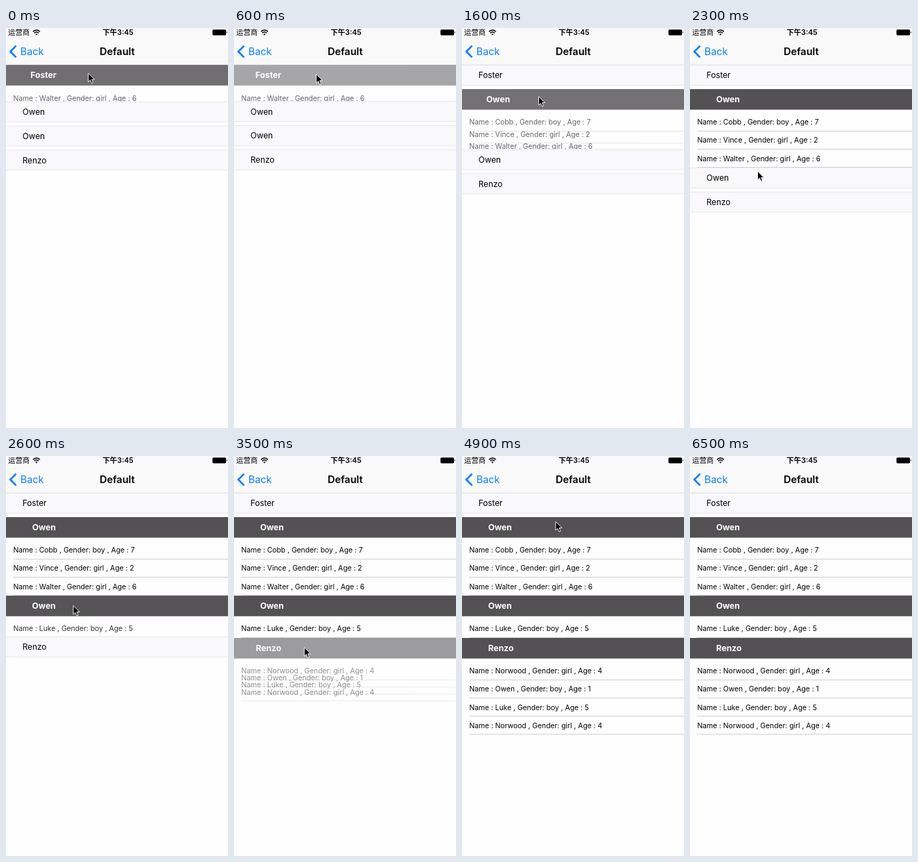
These frames come from a looping animation (320x576 px, 6600 ms). An HTML page:

```html
<!DOCTYPE html>
<html lang="en">
<head>
<meta charset="utf-8">
<title>Expandable list</title>
<style>
  html, body { margin: 0; width: 100%; height: 100%; overflow: hidden; background: #fefefe; }
  svg { display: block; width: 320px; height: 576px; }
  text { font-family: Inter, "Noto Sans CJK SC", "Noto Sans CJK", sans-serif; white-space: pre; }
</style>
</head>
<body>
<svg id="stage" viewBox="0 0 320 576">
  <rect width="320" height="576" fill="#fefefe"/>
  <rect width="320" height="53" fill="#f9f9fa"/>
  <rect y="52.9" width="320" height=".7" fill="#aaaaad"/>
  <g id="list"></g>
  <text x="3" y="10.2" font-size="10.4">运营商</text>
  <g fill="none" stroke="#000" stroke-width="1.5">
    <path d="M38.8 5.2Q43.9 .8 49 5.2M40.6 7.2Q43.9 4.5 47.2 7.2"/>
    <path d="M43.9 10.6l-1.8-1.8q1.8-1.3 3.6 0z" fill="#000" stroke="none"/>
  </g>
  <text x="161.5" y="10.2" font-size="10.5" font-weight="600" text-anchor="middle">下午3:45</text>
  <rect x="297.6" y="2.2" width="19.6" height="8.2" rx="1.6"/>
  <path d="M318 4.8q1.7 1.5 0 3z"/>
  <path d="M14.6 25.6L6.2 34l8.4 8.4" fill="none" stroke="#0a7fff" stroke-width="2.6"/>
  <text x="20.8" y="39.2" font-size="14.4" fill="#0a7fff">Back</text>
  <text x="160.3" y="39.2" font-size="14.5" font-weight="600" text-anchor="middle">Default</text>
  <path id="cursor" d="M0 0V12.6L2.9 9.9 4.9 14.5 7 13.6 5.1 9.1H9.1Z"
        stroke="#fff" stroke-width=".9" stroke-linejoin="round"/>
</svg>
<script>
const LOOP = 6600, STEP = 100, DURATION = 300;
const TOP = 53.2, PITCH = 34.8, HEADER = 29.6, ROW = 26.1;
const CLOSED = [249, 248, 250], OPEN = [83, 81, 83];

const sections = [
  { title: 'Foster', opens: -183, closes: 480, people: [['Walter', 'girl', 6]] },
  { title: 'Owen', opens: 1421, people: [['Cobb', 'boy', 7], ['Vince', 'girl', 2], ['Walter', 'girl', 6]] },
  { title: 'Owen', opens: 2357, people: [['Luke', 'boy', 5]] },
  { title: 'Renzo', opens: 3370, people: [['Norwood', 'girl', 4], ['Owen', 'boy', 1], ['Luke', 'boy', 5], ['Norwood', 'girl', 4]] },
];

// Pointer path: time, x, y
const path = [
  [0, 118.5, 65], [400, 118.5, 65], [900, 118.5, 69], [1000, 119, 72], [1100, 122, 79],
  [1200, 92, 105], [1300, 92, 105], [1400, 108, 99], [1600, 110.5, 98.5], [1700, 110.5, 99],
  [2000, 98, 197], [2200, 98, 197], [2400, 97, 215.5], [2900, 97, 215.5], [3300, 101.5, 275.5],
  [3900, 101, 276], [4600, 131, 114], [4900, 135, 94.5], [5000, 135, 94.5], [5500, 74.5, 56], [5700, 88.5, 49.5],
];
const POINTER_END = 5800;

const clamp = v => Math.min(1, Math.max(0, v));
const mix = (a, b, k) => a + (b - a) * k;

function ease(t) {
  // cubic-bezier(.42, 0, .58, 1), solved by bisection
  let lo = 0, hi = 1;
  for (let i = 0; i < 20; i++) {
    const s = (lo + hi) / 2;
    const x = 1.26 * s * (1 - s) ** 2 + 1.74 * s * s * (1 - s) + s ** 3;
    if (x < t) lo = s; else hi = s;
  }
  return lo * lo * (3 - 2 * lo);
}

function set(node, attrs) {
  for (const key in attrs) node.setAttribute(key, attrs[key]);
  return node;
}

function add(parent, tag, attrs, label = '') {
  const node = set(document.createElementNS('http://www.w3.org/2000/svg', tag), attrs);
  node.textContent = label;
  return parent.appendChild(node);
}

const list = document.getElementById('list');
const cursor = document.getElementById('cursor');

for (const section of sections) {
  section.rows = section.people.map(([name, gender, age]) => {
    const row = add(list, 'g', {});
    add(row, 'text', { x: 10.5, y: 16.5, 'font-size': 10.3 }, `Name : ${name} , Gender: ${gender} , Age : ${age}`);
    add(row, 'rect', { x: 10.5, y: ROW - .7, width: 309.5, height: .7, fill: '#bcbbc0' });
    return row;
  });
  section.header = add(list, 'g', {});
  section.fill = add(section.header, 'rect', { width: 320, height: HEADER });
  section.border = add(section.header, 'path', {
    d: `M0 .3H320M0 ${HEADER - .3}H320`, stroke: '#dddce0', 'stroke-width': .6,
  });
  section.label = add(section.header, 'text', { y: 19.1 }, section.title);
}

function openness({ opens, closes }, time, lead = 0) {
  const phase = start => time < start ? 0 : clamp((time - start) / DURATION + lead);
  return closes !== undefined && time >= closes ? 1 - phase(closes) : phase(opens);
}

function drawSection(section, top, time) {
  const linear = openness(section, time);
  const spread = ease(linear);
  const tint = ease(openness(section, time, .1));
  const active = tint > .001;

  set(section.header, { transform: `translate(0 ${top})` });
  set(section.fill, { fill: `rgb(${CLOSED.map((c, i) => Math.round(mix(c, OPEN[i], tint)))})` });
  set(section.border, { opacity: active ? 0 : 1 });
  set(section.label, {
    x: mix(23.7, 37.7, tint),
    fill: active ? '#fff' : '#000',
    'font-size': active ? 12.1 : 11.8,
    'font-weight': active ? 700 : 400,
  });
  section.rows.forEach((row, i) => set(row, {
    transform: `translate(0 ${top + PITCH + i * ROW * spread})`,
    opacity: linear,
  }));
  return top + PITCH + section.rows.length * ROW * spread;
}

function drawCursor(time) {
  const next = path.findIndex(point => point[0] > time);
  const end = path[next < 0 ? path.length - 1 : next];
  const start = next < 0 ? end : path[next - 1];
  const k = end === start ? 0 : (time - start[0]) / (end[0] - start[0]);
  set(cursor, {
    transform: `translate(${mix(start[1], end[1], k)} ${mix(start[2], end[2], k)})`,
    visibility: time < POINTER_END ? 'visible' : 'hidden',
  });
}

function render(time) {
  sections.reduce((top, section) => drawSection(section, top, time), TOP);
  drawCursor(time);
}

const began = performance.now();
function tick() {
  const time = (performance.now() - began) % LOOP;
  render(Math.floor(time / STEP) * STEP);
  requestAnimationFrame(tick);
}
tick();
</script>
</body>
</html>
```
